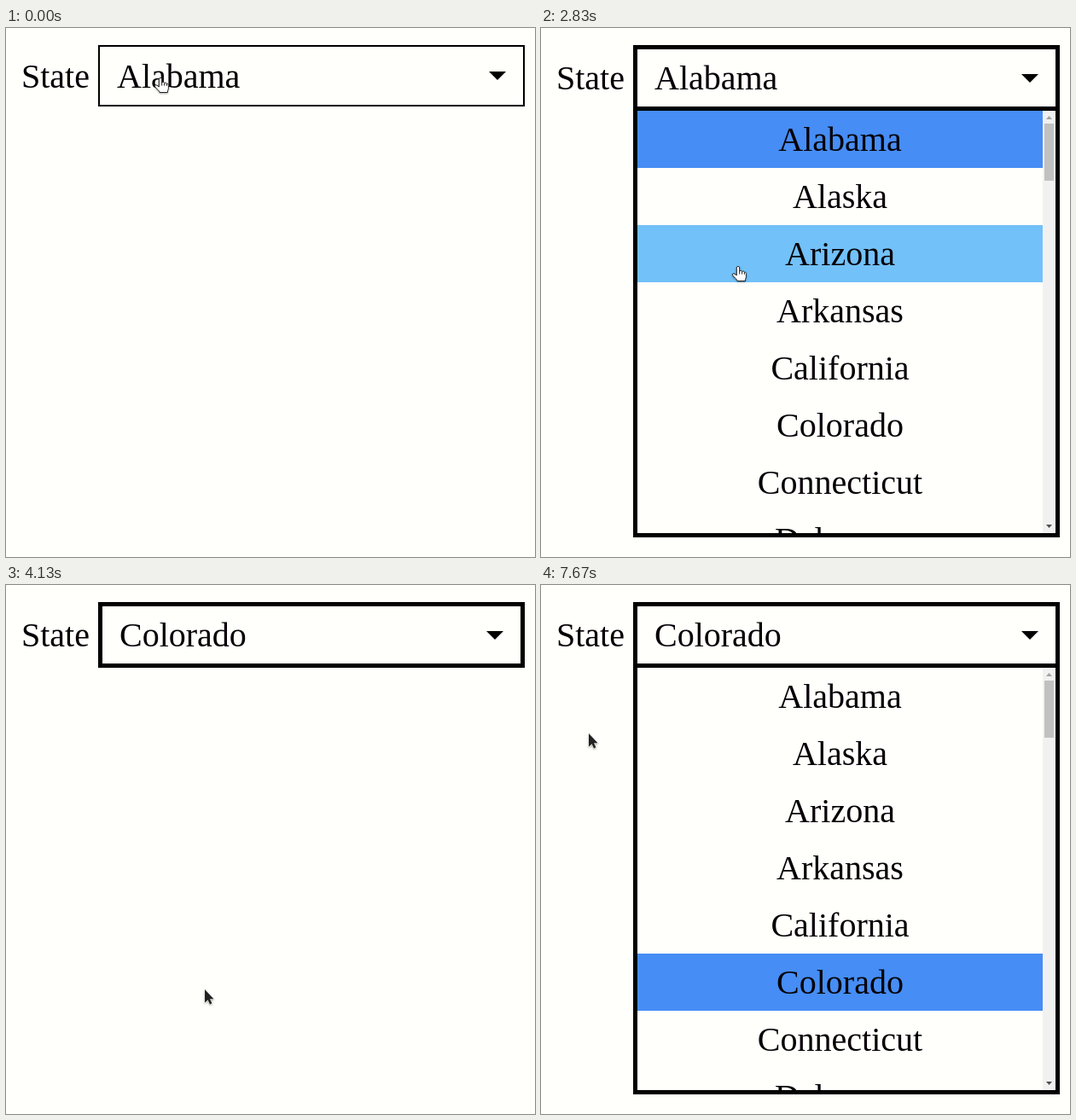
These frames come from a looping animation (620 px wide and 620 px high, 8 s). An HTML page:

```html
<!DOCTYPE html>
<html lang="en">
<head>
<meta charset="utf-8">
<title>State select</title>
<style>
  html, body { margin: 0; width: 100%; height: 100%; overflow: hidden; background: #fffffc; }
  svg { display: block; }
  text { font: 40px "Liberation Serif", "Times New Roman", serif; fill: #050005; }
  .frame { fill: none; stroke: #000; }
  #options text { text-anchor: middle; }
  #cursor { filter: drop-shadow(0 1px 1px rgba(0, 0, 0, .35)); }
  #hand { fill: #fff; stroke: #222; stroke-linejoin: round; }
  #arrow { fill: #222; stroke: #fff; stroke-width: 1; paint-order: stroke; }
</style>
</head>
<body>
<svg id="stage" width="620" height="620" viewBox="0 0 620 620">
  <text id="label" x="18">State</text>
  <rect id="box" class="frame"/>
  <text id="value"></text>
  <path id="caret" d="M0 0H20L10 10Z"/>

  <g id="list">
    <svg id="options" x="113" y="97" width="475" height="495" overflow="hidden">
      <rect id="hover" width="475" height="67" fill="#72c1f9"/>
      <rect id="chosen" width="475" height="67" fill="#468df5"/>
    </svg>
    <rect x="588" y="97" width="15" height="495" fill="#f1f1f1"/>
    <rect x="590" y="112" width="11" height="67" fill="#c1c1c1"/>
    <path d="M592 107h7l-3.5-4z" fill="#a3a3a3"/>
    <path d="M592 582h7l-3.5 4z" fill="#505050"/>
    <rect class="frame" x="110.5" y="94.5" width="495" height="500" stroke-width="5"/>
  </g>

  <g id="cursor">
    <g id="hand">
      <path d="M-1.7 10.8V1.8Q-1.7.5 0 .5T1.7 1.8V6.2Q2.2 5.2 3.3 5.4 4.4 5.6 4.6 6.6 5.6 5.8 6.6 6.3 7.3 6.6 7.4 7.4 8.6 6.9 9.2 7.8 9.5 8.4 9.4 9.6V12.5Q9.4 14.2 8.4 15.6V17.5H-1V16.5Q-3.6 14.4-6.4 10.8-7 9.6-6 9-5 8.6-4 9.2L-1.7 11Z"/>
      <path d="M1.7 6v3.6M4.6 6.6v3M7.4 7.4v2.4" fill="none"/>
    </g>
    <path id="arrow" d="M0 0V15.5L3.6 12.2 6 17.4 8.4 16.3 6 11.2H10.5Z"/>
  </g>
</svg>

<script>
const LOOP = 8000, ROW = 67;
const TIMES = { focus: 1200, open: 1300, pick: 4030, release: 4130, reopen: 6870 };
const states = ["Alabama", "Alaska", "Arizona", "Arkansas", "California", "Colorado", "Connecticut", "Delaware"];

// Pointer moves: first step, last step, step count, end x, end y
const START = [181, 58];
const moves = [
  [1830, 2230, 5, 211, 141],
  [2330, 2630, 4, 231, 222],
  [2670, 2830, 3, 231, 279],
  [2900, 3030, 3, 231, 345],
  [3170, 3170, 1, 231, 368],
  [3230, 3730, 7, 233, 474],
  [6170, 6170, 1, 240, 366],
  [6270, 6570, 4, 282, 74],
  [7070, 7670, 8, 56, 174]
];

const $ = id => document.getElementById(id);
const set = (id, attrs) => {
  for (const name in attrs) $(id).setAttribute(name, attrs[name]);
};
const show = (id, on) => set(id, { visibility: on ? "inherit" : "hidden" });

states.forEach((name, i) => {
  const text = document.createElementNS("http://www.w3.org/2000/svg", "text");
  text.textContent = name;
  text.setAttribute("x", 237.5);
  text.setAttribute("y", 47 + i * ROW);
  $("options").append(text);
});

function pointerAt(t) {
  let [x, y] = START;
  for (const [from, to, steps, endX, endY] of moves) {
    if (t < from) break;
    const gap = (to - from) / (steps - 1) || 1;
    const part = Math.min(steps, 1 + Math.floor((t - from) / gap + 1e-6)) / steps;
    x += (endX - x) * part;
    y += (endY - y) * part;
  }
  return [Math.round(x), Math.round(y)];
}

function draw(t) {
  const focused = t >= TIMES.focus;
  const open = (t >= TIMES.open && t < TIMES.pick) || t >= TIMES.reopen;
  const chosen = t < TIMES.pick ? 0 : 5;
  const [x, y] = pointerAt(t);
  const inside = x >= 108 && x < 608;
  const row = Math.floor((y - 97) / ROW);
  const overRow = open && inside && row >= 0;
  const overBox = inside && y >= 20 && y < 97;
  const releasing = t >= TIMES.pick && t < TIMES.release;
  const hand = overRow || overBox || releasing;
  const baseline = focused ? 72 : 70;

  set("label", { y: baseline });
  set("value", { x: focused ? 133 : 130, y: baseline });
  $("value").textContent = states[chosen];
  set("box", focused
    ? { x: 110.5, y: 22.5, width: 495, height: 72, "stroke-width": 5 }
    : { x: 109, y: 21, width: 498, height: 70, "stroke-width": 2 });
  set("caret", { transform: focused ? "translate(563 54)" : "translate(566 51)" });

  show("list", open);
  set("chosen", { y: chosen * ROW });
  set("hover", { y: row * ROW });
  show("hover", overRow);

  set("cursor", { transform: `translate(${x} ${y})` });
  show("hand", hand);
  show("arrow", !hand);
}

const begin = performance.now();
function tick() {
  draw((performance.now() - begin) % LOOP);
  requestAnimationFrame(tick);
}
tick();
</script>
</body>
</html>
```
